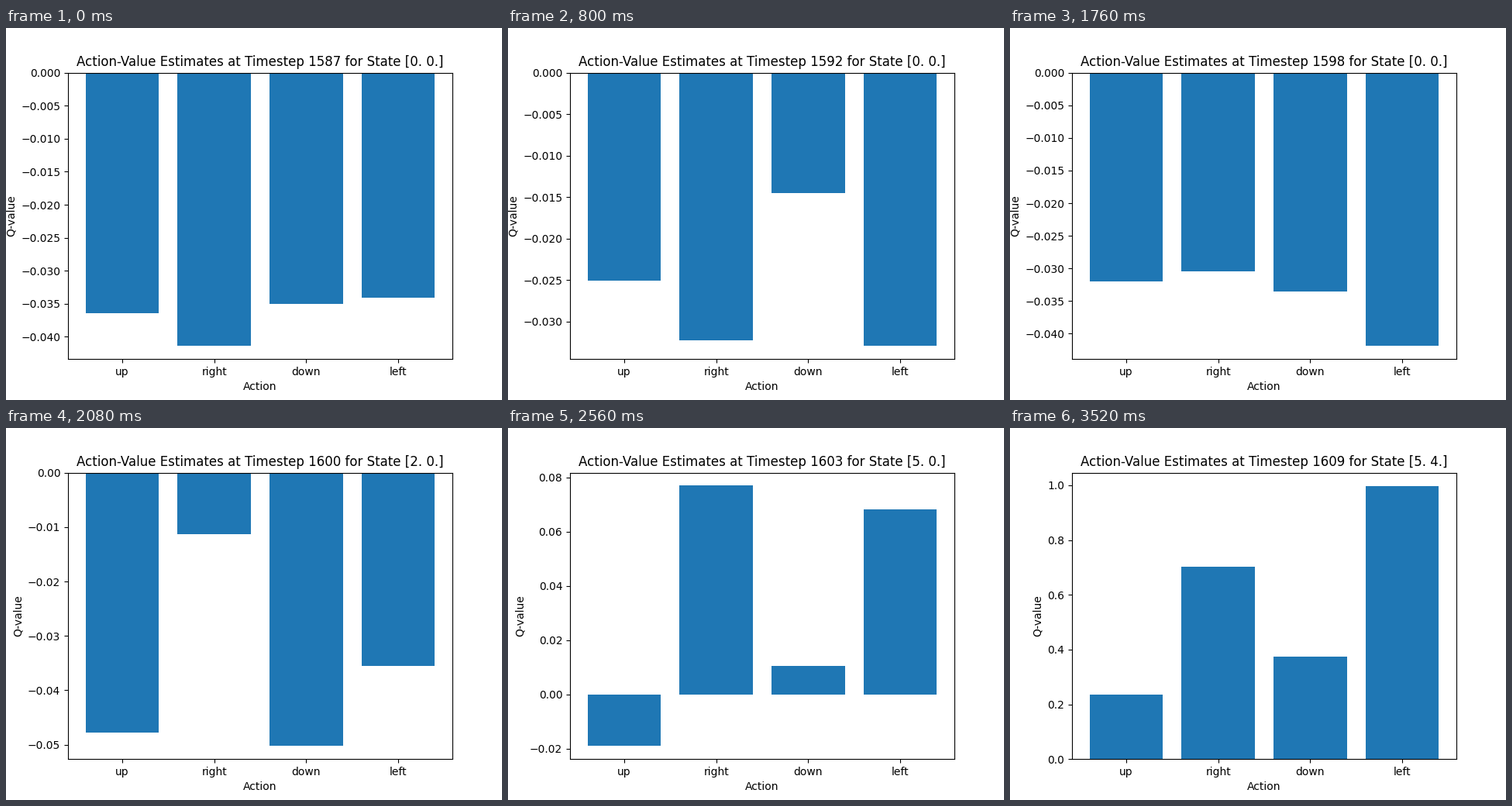
Animation of 640 by 480 pixels, one loop 3680 ms. Source, as a matplotlib script:

```python
import numpy as np
import matplotlib.pyplot as plt
from matplotlib.animation import FuncAnimation

plt.rcParams["font.family"] = "DejaVu Sans"

ACTIONS = ["up", "right", "down", "left"]
FIRST_STEP = 1587
N_STEPS = 23

# Step offset -> estimates in ACTIONS order; linear in between
KEYS = {
    0: (-.03643, -.04131, -.03498, -.03408),
    5: (-.02508, -.0323, -.0145, -.0329),
    9: (-.0261, -.03248, -.0266, -.03806),
    11: (-.0320, -.0305, -.0335, -.0418),
    13: (-.04777, -.0113, -.05013, -.0355),
    15: (-.03716, .04386, -.0043, .0114),
    17: (-.0010, .1100, .0250, .1250),
    18: (.04356, .15366, .05695, .18203),
    22: (.2355, .7020, .3740, .9965),
}


def estimates(i):
    return [np.interp(i, list(KEYS), q) for q in zip(*KEYS.values())]


def state(i):
    """Short detour along y, then right along the edge and up to the corner."""
    x = max(0, min(i - 11, 5))
    y = max(0, min(i, 5 - i), min(i - 17, 4))
    return x, y


fig, ax = plt.subplots(figsize=(6.4, 4.8), dpi=100)


def draw(i):
    ax.clear()
    ax.bar(ACTIONS, estimates(i), color="#1f77b4")
    x, y = state(i)
    ax.set_title(f"Action-Value Estimates at Timestep {FIRST_STEP + i} "
                 f"for State [{x}. {y}.]")
    ax.set_xlabel("Action")
    ax.set_ylabel("Q-value")
    return []


anim = FuncAnimation(fig, draw, frames=N_STEPS, init_func=lambda: draw(0),
                     interval=160, repeat=True, repeat_delay=0, blit=False)
plt.show()
```
